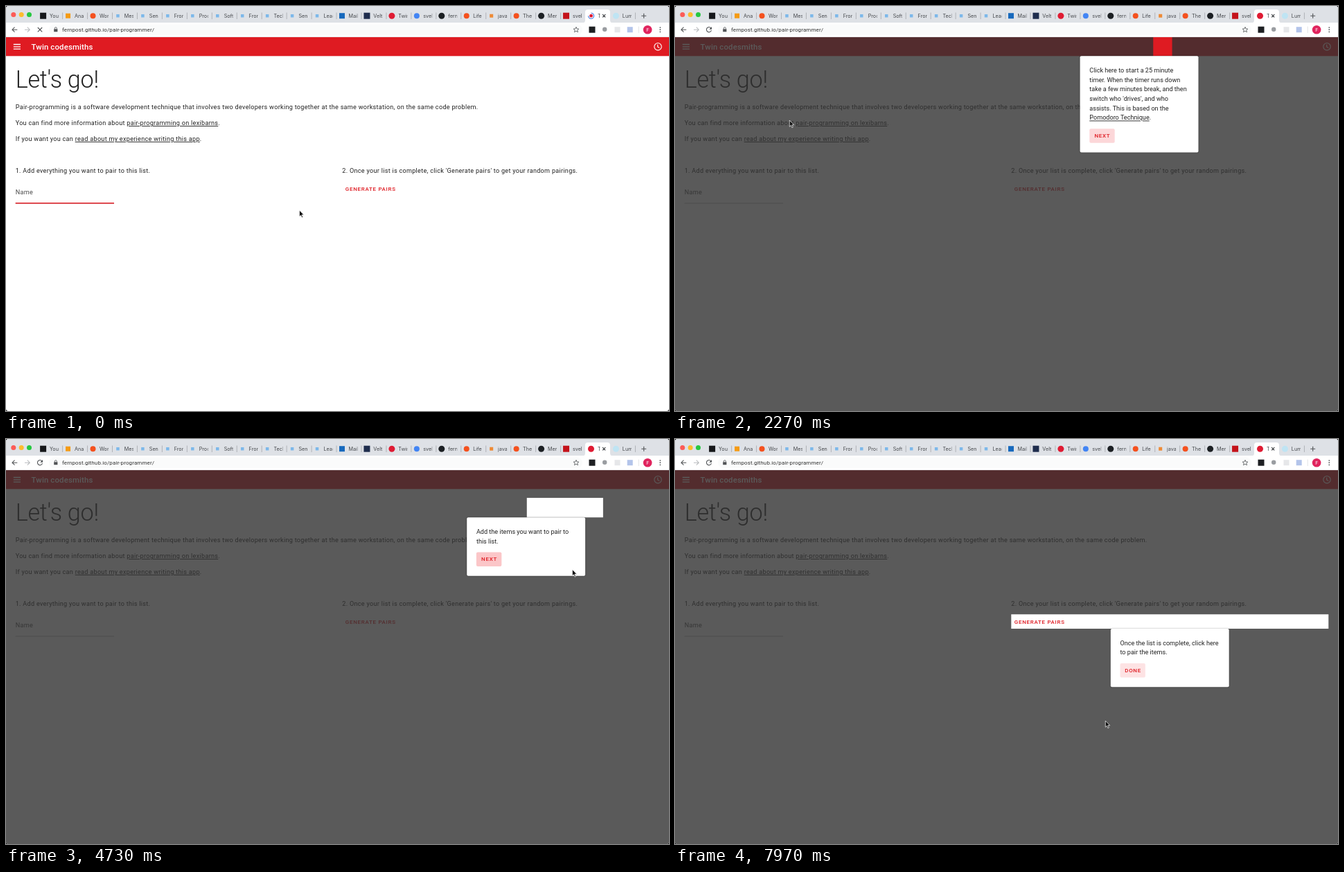
Animation, 957 px wide and 585 px high, one loop 8000 ms. Source, as an HTML page:

```html
<!DOCTYPE html>
<html lang="en">
<head>
<meta charset="utf-8">
<title>Guided tour</title>
<style>
  html, body { margin: 0; width: 100%; height: 100%; overflow: hidden; background: #111; }
  svg { display: block; width: 100vw; height: 100vh; border-radius: 3.5px; }
  text { font: 9.11px Roboto, sans-serif; fill: #222; }
  .body text { letter-spacing: .285px; }
  .body text.label { fill: #4a4a4a; }
  .link { text-decoration: underline; }
  text.title { font-size: 34.2px; font-weight: 300; letter-spacing: -.28px; }
  text.appName { font-size: 11.39px; font-weight: 500; letter-spacing: .14px; fill: #fff; }
  text.button { font-size: 7.97px; font-weight: 500; letter-spacing: .71px; fill: #df1b22; }
  text.tab { font: 7.2px Inter, sans-serif; fill: #45484c; }
  text.url { font-size: 8px; letter-spacing: .11px; fill: #333; }
  .icon { fill: none; stroke: #505356; stroke-width: 1.1; }
  .popup { filter: drop-shadow(0 .6px 1.2px rgba(0, 0, 0, .35)); }
</style>
</head>
<body>
<svg viewBox="0 0 957 585">
  <rect width="957" height="585" fill="#fff"/>

  <g id="page">
    <rect y="45" width="957" height="27.3" fill="#df1b22"/>
    <path d="M10.8 55.5h10.2M10.8 58.8h10.2M10.8 62.1h10.2" stroke="#fff" stroke-width="1.3"/>
    <text class="appName" x="36.5" y="62.9">Twin codesmiths</text>
    <g fill="none" stroke="#fff" stroke-width="1.1">
      <circle cx="941" cy="58.7" r="5.2"/><path d="M940.7 55.6v3.4l2.6 1.6"/>
    </g>
    <text class="title" x="13.7" y="117.5">Let's go!</text>
    <g class="body">
      <text x="13.7" y="149.3">Pair-programming is a software development technique that involves two developers working together at the same workstation, on the same code problem.</text>
      <text x="13.7" y="172.1">You can find more information about <tspan class="link">pair-programming on lexibarns</tspan>.</text>
      <text x="13.7" y="194.9">If you want you can <tspan class="link">read about my experience writing this app</tspan>.</text>
      <text x="13.7" y="240.5">1. Add everything you want to pair to this list.</text>
      <text x="485.3" y="240.5">2. Once your list is complete, click 'Generate pairs' to get your random pairings.</text>
      <text class="label" x="13.7" y="271.7">Name</text>
    </g>
    <text class="button" x="489.8" y="266.6">GENERATE PAIRS</text>
    <path d="M13.7 285H156" stroke="#888" stroke-width=".6"/>
    <path id="focusLine" d="M13.7 284.8H156" stroke="#df1b22" stroke-width="1.4"/>
  </g>

  <g id="tour">
    <path id="shade" fill="#313131" fill-opacity=".8" fill-rule="evenodd"/>
    <g id="popups"></g>
  </g>

  <g id="browser">
    <rect width="957" height="24.5" fill="#dee1e6"/>
    <rect y="24" width="957" height="20.6" fill="#fff"/>
    <path d="M0 44.6H957" stroke="#d5d7da" stroke-width=".5"/>
    <circle cx="10.8" cy="12.6" r="3.5" fill="#fc5b57"/>
    <circle cx="22.2" cy="12.6" r="3.5" fill="#fdbc2e"/>
    <circle cx="33.5" cy="12.6" r="3.5" fill="#27c840"/>
    <path d="M832 24.5q4 0 4-4V9q0-4 4-4h28q4 0 4 4v11.5q0 4 4 4z" fill="#fff"/>
    <g id="tabs"></g>
    <path class="icon" d="M861 12l4.4 4.4m0-4.4l-4.4 4.4M917.2 14.2h7m-3.5-3.5v7"/>
    <path class="icon" d="M16.3 34.2H9m3.5-3.5L9 34.2l3.5 3.5"/>
    <path class="icon" style="stroke:#b9bbbe" d="M27 34.2h7.3m-3.5-3.5l3.5 3.5-3.5 3.5"/>
    <path id="stop" class="icon" d="M45.8 31l6.4 6.4m0-6.4l-6.4 6.4"/>
    <g id="reload"><path class="icon" d="M52 32a3.6 3.6 0 1 0 .5 3.2"/><path d="M53 30v3.7h-3.7z" fill="#505356"/></g>
    <rect x="62" y="26.5" width="770" height="15.4" rx="7.7" fill="#f1f3f4" fill-opacity=".35"/>
    <path d="M69.2 33.2h5.2v4h-5.2z" fill="#505356"/>
    <path class="icon" style="stroke-width:.8" d="M70.3 33.5v-1.3a1.5 1.5 0 0 1 3 0v1.3"/>
    <text class="url" x="81" y="37">fernpost.github.io/pair-programmer/</text>
    <path class="icon" style="stroke-width:.8" d="M823 30.3l1.1 2.6 2.8.2-2.1 1.8.7 2.8-2.5-1.5-2.5 1.5.7-2.8-2.1-1.8 2.8-.2z"/>
    <rect x="841.5" y="29.7" width="9" height="9" fill="#1d1f22"/>
    <circle cx="864.2" cy="33.8" r="3.2" fill="#9a9da1"/>
    <rect x="878.5" y="30.2" width="8" height="8" fill="#e6e7e9"/>
    <rect x="896.7" y="30.2" width="8" height="8" fill="#b3c4ea"/>
    <path d="M913.2 29.5v9.5" stroke="#d0d2d5" stroke-width=".6"/>
    <circle cx="926.1" cy="34.2" r="6.3" fill="#e0245e"/>
    <text x="926.1" y="36.8" text-anchor="middle" style="font-size:7px;fill:#fff">F</text>
    <g fill="#505356"><circle cx="944.3" cy="31.1" r=".9"/><circle cx="944.3" cy="34.2" r=".9"/><circle cx="944.3" cy="37.3" r=".9"/></g>
    <g id="spinner">
      <circle cx="844.6" cy="14.2" r="5" fill="#fff"/><circle cx="844.6" cy="14.2" r="2.4" fill="#df1b33"/>
      <path id="spinArc" d="M844.6 10.2a4 4 0 1 1-4 4" fill="none" stroke="#3b78e7" stroke-width="1.1"/>
    </g>
  </g>

  <path id="arrow" d="M0 0v9.2l2.1-1.9 1.5 3.4 1.5-.7-1.5-3.3h2.9z" fill="#111" stroke="#fff" stroke-width=".7"/>
  <path id="hand" d="M-.8.6q.8-1.3 1.6 0V4q.8-.8 1.5.1.9-.6 1.5.4 1.2-.4 1.4.8v2.2q-.3 1.3-1 2.4H-.5Q-1.5 8.2-3.3 6q-.2-1.2 1-.9l1.5 1.2z" fill="#fff" stroke="#111" stroke-width=".75"/>
</svg>

<script>
const LOOP = 8000, LOADED = 400, FADE_START = 250, FADE_TIME = 400, MOVE_TIME = 500;
const POPUP_WIDTH = 170.9, PAD = 13.7, LINE = 13.7;
const $ = id => document.getElementById(id);
const clamp = v => Math.min(1, Math.max(0, v));
const mix = (a, b, p) => a + (b - a) * p;
const ease = p => p < .5 ? 2 * p * p : 1 - 2 * (1 - p) ** 2;
const show = (el, on) => el.style.display = on ? '' : 'none';

// Browser tabs: label, icon colour, icon shape (c = circle, s = square), icon size.
const site = label => [label, '#7db8ea', 's', 4.5];
const tabs = [
  ['Your', '#15171a', 's'], ['Anal', '#f49b14', 's', 7], ['Wor', '#f4511e', 'c', 8],
  ...['Mes', 'Sen', 'Fron', 'Proc', 'Soft', 'Fron', 'Tech', 'Sen', 'Lead'].map(site),
  ['Mail', '#1769bd', 's', 8], ['Velt', '#1e2d4d', 's'], ['Twin', '#df1b33', 'c'],
  ['svelte', '#4285f4', 'c', 8], ['fern', '#1b1f23', 'c'], ['Life', '#f4511e', 'c', 8],
  ['java', '#ee8a35', 's', 5], ['The', '#f4511e', 'c', 8], ['Mer', '#1b1f23', 'c'],
  ['svelte', '#c4121a', 's'], ['T', '#df1b33', 'c'], ['Lum', '#bfe4f3', 'c']
];
const ACTIVE = 22;
$('tabs').innerHTML = tabs.map(([label, color, shape, size = 9], i) => {
  const x = 53.6 + i * 35.95;
  const textWidth = i === ACTIVE ? 4 : 13.5;
  const divider = i === ACTIVE || i === ACTIVE - 1 ? '' :
    `<path d="M${x + 28} 9.5v9.5" stroke="#92969b" stroke-width=".6"/>`;
  return `<rect x="${x - size / 2}" y="${14.2 - size / 2}" width="${size}" height="${size}"
      rx="${shape === 'c' ? size / 2 : 0}" fill="${color}"/>
    <clipPath id="tab${i}"><rect x="${x + 9}" y="6" width="${textWidth}" height="16"/></clipPath>
    <text class="tab" x="${x + 9.4}" y="16.8" clip-path="url(#tab${i})">${label}</text>${divider}`;
}).join('');

// Tour steps: start time, highlighted box, popup corner, text lines.
const steps = [
  { at: 0, hole: [2.3, 45, 27.3, 27.3], popup: [0, 72.3], lines: ['Click here to open the navigation.'] },
  { at: 1950, hole: [927.4, 45, 27.3, 27.3], popup: [786.1, 72.3], lines: [
    'Click here to start a 25 minute', 'timer. When the timer runs down', 'take a few minutes break, and then',
    "switch who 'drives', and who", 'assists. This is based on the', '<tspan class="link">Pomodoro Technique</tspan>.'] },
  { at: 4576, hole: [13.7, 253.3, 458, 32], popup: [157.2, 285.3],
    lines: ['Add the items you want to pair to', 'this list.'] },
  { at: 6880, hole: [485.3, 253.3, 458, 20.6], popup: [628.8, 273.9],
    lines: ['Once the list is complete, click here', 'to pair the items.'], action: 'DONE' }
];
$('popups').innerHTML = steps.map(({ lines, action = 'NEXT' }) => {
  const top = PAD + LINE * lines.length + 9.1;
  return `<g class="popup"><rect width="${POPUP_WIDTH}" height="${top + 20.5 + PAD}" rx="2" fill="#fff"/>
    ${lines.map((line, i) => `<text x="${PAD}" y="${23.7 + i * LINE}">${line}</text>`).join('')}
    <rect class="tint" x="${PAD}" y="${top}" width="36.4" height="20.5" rx="2" fill="#ee1c25"/>
    <text class="button" x="${PAD + 18.6}" y="${top + 13}" text-anchor="middle">${action}</text></g>`;
}).join('');
const popups = [...$('popups').children];

// Pointer path: time, x, y.
const path = [
  [0, 423.5, 295], [900, 423.5, 295], [1450, 34, 119.5], [2000, 34, 119.5], [2500, 330, 217],
  [2970, 543, 254], [3280, 640, 269], [3420, 640, 269], [4150, 817, 185], [4600, 817, 185],
  [4730, 817.5, 188.3], [5050, 780, 260], [5400, 613.8, 359.5], [5680, 480, 385], [5900, 400, 371],
  [6550, 184, 343], [7000, 184, 343], [7540, 480, 440], [7970, 621.3, 407], [8000, 621.3, 407]
];
function slope(i, axis) {
  const a = path[i - 1], b = path[i], c = path[i + 1];
  if (!a || !c || a[1] === b[1] || b[1] === c[1]) return 0;
  return (c[axis] - a[axis]) / (c[0] - a[0]);
}
function pointerAt(t) {
  const i = Math.max(0, path.findIndex(p => p[0] > t) - 1);
  const a = path[i], b = path[i + 1], span = b[0] - a[0], u = (t - a[0]) / span;
  return [1, 2].map(k =>
    mix(a[k], b[k], u * u * (3 - 2 * u)) +
    span * (slope(i, k) * u * (1 - u) ** 2 - slope(i + 1, k) * u * u * (1 - u)));
}

function draw(t) {
  const current = steps.findLastIndex(s => t >= s.at);
  const step = steps[current], previous = steps[current - 1] || step;
  const progress = current ? ease(clamp((t - step.at) / MOVE_TIME)) : 1;
  const blend = key => step[key].map((v, i) => mix(previous[key][i], v, progress));

  const fade = clamp((t - FADE_START) / FADE_TIME);
  $('tour').style.opacity = fade;
  $('focusLine').style.opacity = 1 - fade;
  const [hx, hy, hw, hh] = blend('hole');
  $('shade').setAttribute('d', `M0 45H957V585H0zM${hx} ${hy}h${hw}v${hh}h${-hw}z`);

  const [px, py] = blend('popup'), [x, y] = pointerAt(t);
  popups.forEach((el, i) => show(el, i === current));
  popups[current].setAttribute('transform', `translate(${px} ${py})`);

  const left = px + PAD, top = py + PAD + LINE * step.lines.length + 9.1;
  const hover = fade > 0 && x > left && x < left + 36.4 && y > top && y < top + 20.5;
  const ripple = current ? .13 * clamp((step.at + 400 - t) / 200) : 0;
  popups[current].querySelector('.tint').setAttribute('fill-opacity',
    (current ? .12 : 0) + (hover ? .045 : 0) + ripple);

  show($('hand'), hover);
  show($('arrow'), !hover);
  $(hover ? 'hand' : 'arrow').setAttribute('transform', `translate(${x} ${y})`);

  const loading = t < LOADED;
  show($('stop'), loading);
  show($('reload'), !loading);
  show($('spinner'), loading);
  $('spinArc').setAttribute('transform', `rotate(${t * .36} 844.6 14.2)`);
}

function tick() {
  draw(performance.now() % LOOP);
  requestAnimationFrame(tick);
}
tick();
</script>
</body>
</html>
```
